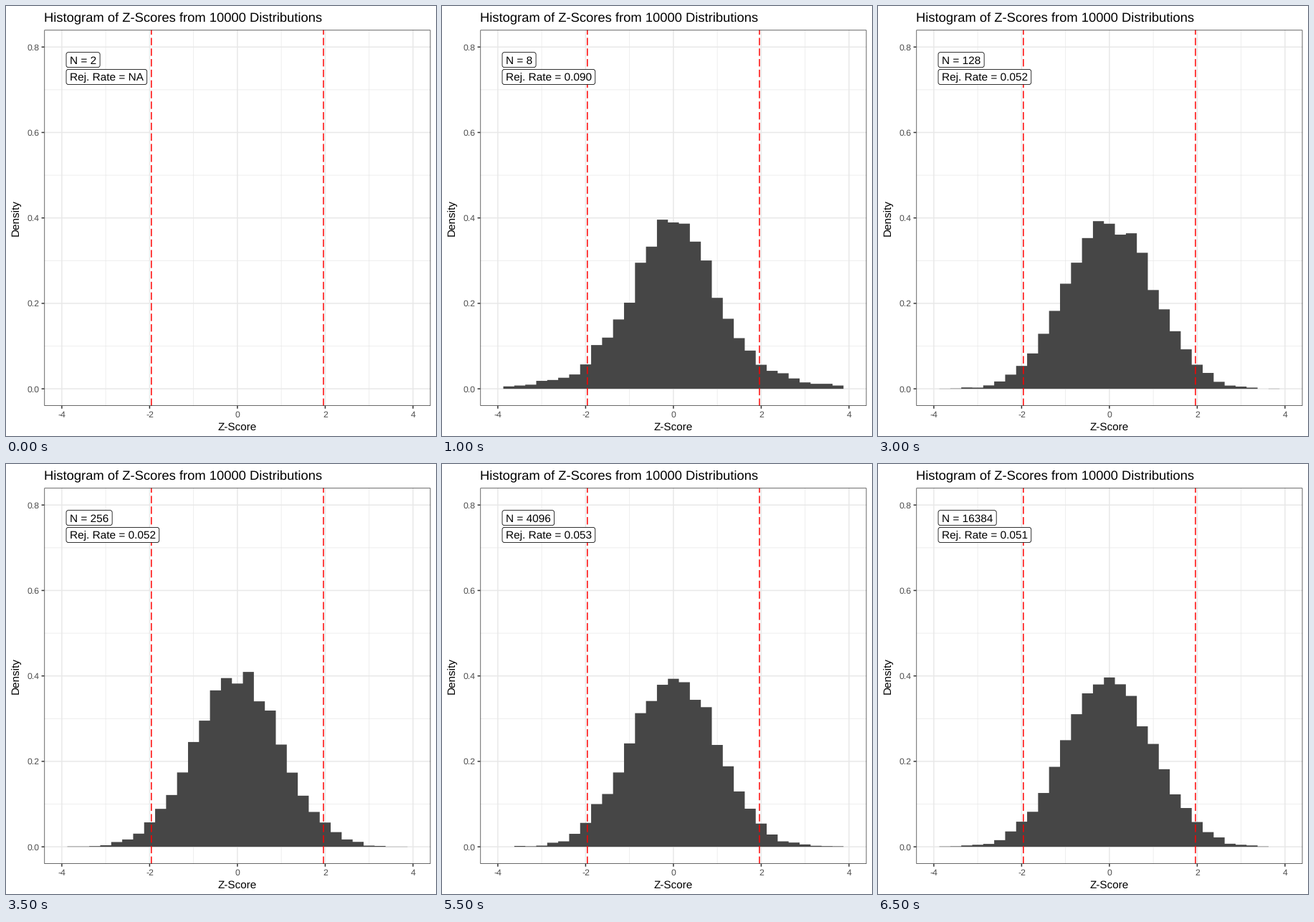
A matplotlib script that plays this animation: 600x600 px, repeating every 7000 ms.

```python
import matplotlib.pyplot as plt
import numpy as np
from matplotlib.animation import FuncAnimation
from matplotlib.patches import FancyBboxPatch, Rectangle

plt.rcParams["font.family"] = "Liberation Sans"
plt.rcParams["text.hinting"] = "none"

DPI = 100
LEFT, RIGHT, TOP, BOTTOM = 53.4, 592.4, 33.4, 558.0
LABEL_EM = 15.33
DRAWS = 10000
EDGES = np.linspace(-3.875, 3.875, 32)
RATES = ["NA", "0.158", "0.090", "0.067", "0.056", "0.054", "0.052",
         "0.052", "0.050", "0.050", "0.050", "0.053", "0.050", "0.051"]


def px_x(v):
    return LEFT + (v + 4.4) / 8.8 * (RIGHT - LEFT)


def px_y(v):
    return BOTTOM - (v + 0.04) / 0.88 * (BOTTOM - TOP)


def points(px):
    return px * 72 / DPI


def z_scores(n):
    """Standardised means of uniform samples; large n uses the limit law."""
    rng = np.random.default_rng(n)
    if n > 64:
        return rng.standard_t(n - 1, DRAWS)
    sample = rng.uniform(-1, 1, (DRAWS, n))
    return sample.mean(axis=1) / sample.std(axis=1, ddof=1) * np.sqrt(n)


def bar_tops(n):
    if n == 2:
        return np.full(EDGES.size - 1, px_y(0))
    density, _ = np.histogram(z_scores(n), EDGES, density=True)
    return px_y(density)


fig = plt.figure(figsize=(6, 6), dpi=DPI, facecolor="white")
ax = fig.add_axes([0, 0, 1, 1])
ax.set_xlim(0, 600)
ax.set_ylim(600, 0)
ax.axis("off")


def line(xs, ys, color, width, z, **kw):
    ax.plot(xs, ys, color=color, lw=points(width), zorder=z, snap=False,
            solid_capstyle="butt", dash_capstyle="butt", **kw)


def text(x, y, s, size, color="black", **kw):
    kw.setdefault("va", "baseline")
    return ax.text(x, y, s, fontsize=size, color=color, zorder=8, **kw)


def grid(xs, ys, width):
    for v in xs:
        line([px_x(v)] * 2, [TOP, BOTTOM], "#e8e8e8", width, 1)
    for v in ys:
        line([LEFT, RIGHT], [px_y(v)] * 2, "#e8e8e8", width, 1)


X_TICKS = range(-4, 5, 2)
Y_TICKS = np.arange(5) * 0.2
grid(range(-3, 4, 2), Y_TICKS[:-1] + 0.1, 0.74)
grid(X_TICKS, Y_TICKS, 1.48)

bars = ax.stairs(bar_tops(2), px_x(EDGES), baseline=px_y(0), fill=True,
                 color="#464646", lw=0, snap=False, zorder=2)

for cut in (-1.96, 1.96):
    line([px_x(cut)] * 2, [BOTTOM, TOP], "red", 1.48, 3,
         linestyle=(0, (7, 3)))

ax.add_patch(Rectangle((LEFT + 0.37, TOP + 0.37), RIGHT - LEFT - 0.74,
                       BOTTOM - TOP - 0.74, fill=False, ec="#333333",
                       lw=points(0.74), snap=False, zorder=4))

for v in X_TICKS:
    line([px_x(v)] * 2, [BOTTOM, BOTTOM + 3.8], "#333333", 1.48, 4)
    text(px_x(v), 573.5, str(v), 8.8, "#4d4d4d", ha="center")
for v in Y_TICKS:
    line([LEFT - 3.8, LEFT], [px_y(v)] * 2, "#333333", 1.48, 4)
    text(46.5, px_y(v) + 4.4, f"{v:.1f}", 8.8, "#4d4d4d", ha="right")

text(LEFT, 20.8, "Histogram of Z-Scores from 10000 Distributions", 13.2)
text((LEFT + RIGHT) / 2, 592, "Z-Score", 11, ha="center")
text(21, (TOP + BOTTOM) / 2, "Density", 11, rotation=90,
     ha="right", va="center")


def label(v):
    y = px_y(v)
    box = FancyBboxPatch((px_x(-3.9), y - 10.5), 50, 21,
                         boxstyle="round,pad=0,rounding_size=3",
                         fc="white", ec="black", lw=points(0.8), zorder=7)
    ax.add_patch(box)
    return box, text(px_x(-3.9) + 5, y + 5.4, "", 11.04)


n_box, n_text = label(0.77)
rate_box, rate_text = label(0.73)


def update(i):
    n = 2 ** (i + 1)
    rate = RATES[i]
    bars.set_data(values=bar_tops(n))
    n_text.set_text(f"N = {n}")
    rate_text.set_text(f"Rej. Rate = {rate}")
    # Boxes follow the advance widths of their text
    n_em = 1.862 + 0.556 * len(str(n))
    rate_em = 5.308 + (1.389 if rate == "NA" else 2.502)
    n_box.set_width(n_em * LABEL_EM + 10)
    rate_box.set_width(rate_em * LABEL_EM + 10)
    return bars, n_box, n_text, rate_box, rate_text


anim = FuncAnimation(fig, update, frames=14, interval=500, repeat=True,
                     repeat_delay=0, blit=False)
plt.show()
```
